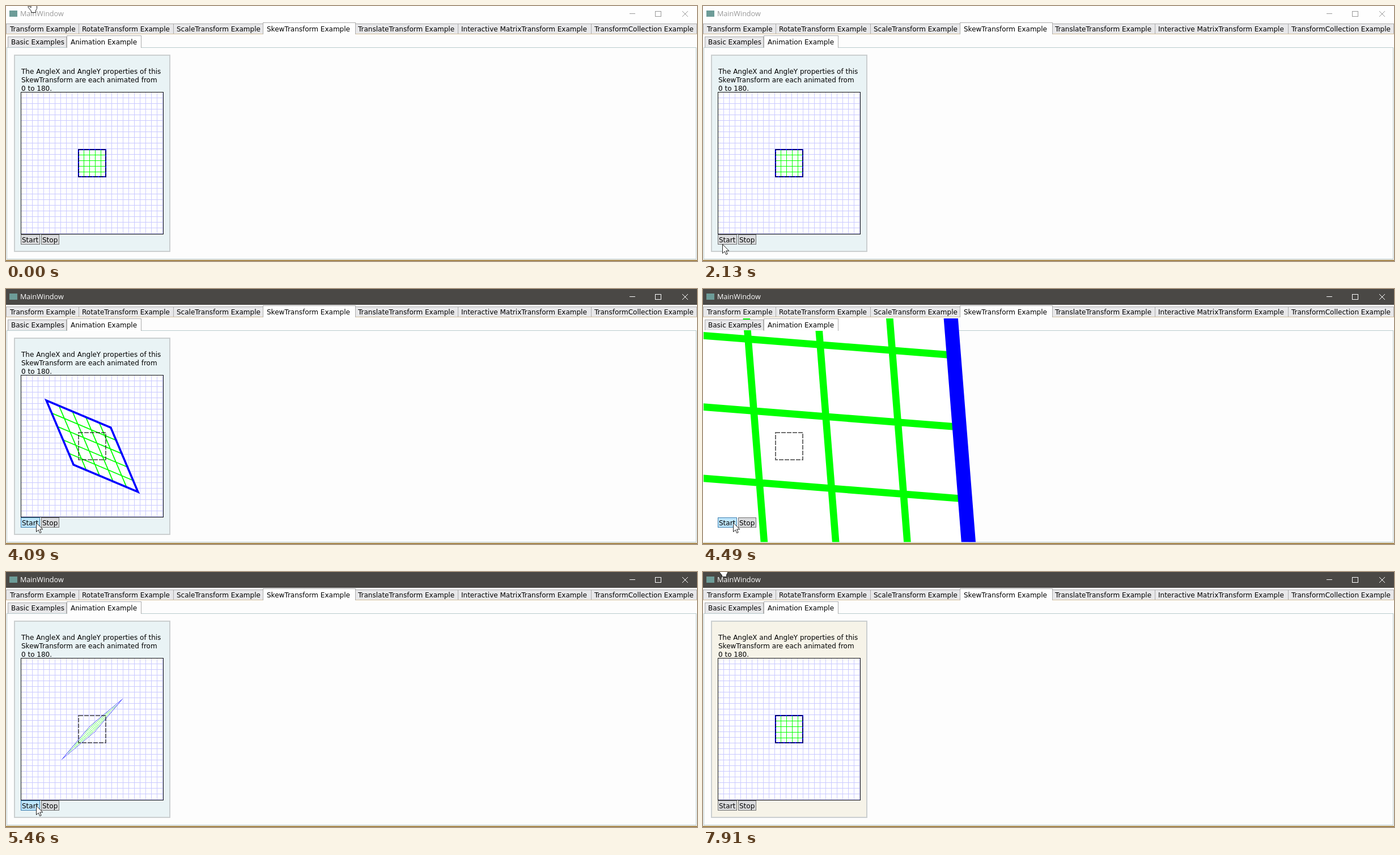
These frames come from a looping animation (1219x451 px, 8.02 s). An HTML page:

```html
<!DOCTYPE html>
<html lang="en">
<head>
<meta charset="utf-8">
<title>Skew animation</title>
<style>
  html, body { margin: 0; width: 100%; height: 100%; overflow: hidden; background: #fdfdfd; }
  svg { display: block; }
  text { font: 12px "DejaVu Sans", Verdana, sans-serif; fill: #000; white-space: pre; }
  .caption { font: 12.6px "Open Sans", "Noto Sans", sans-serif; }
  .crisp { shape-rendering: crispEdges; }
  .tab { fill: #e8e8ea; stroke: #acacac; }
  .selected { fill: #fefefe; }
  .button { fill: #dadbdd; stroke: #707070; }
  .hover { fill: #bee6fd; stroke: #3c7fb1; }
  .cursor { fill: #fff; stroke: #222; stroke-linejoin: round; }
</style>
</head>
<body>
<svg id="stage" width="1219" height="451" viewBox="0 0 1219 451">
  <defs>
    <clipPath id="content"><rect x="1" y="52" width="1217" height="395.5"/></clipPath>
  </defs>
  <rect width="1219" height="451" fill="#fdfdfd"/>
  <path class="crisp" d="M0 49.5H1219" stroke="#d6c09a"/>
  <path class="crisp" d="M0 450H1219" stroke="#a5864c" stroke-width="2"/>
  <rect class="crisp" x="1.5" y="73.5" width="1216" height="374" fill="none" stroke="#b9cbcd"/>

  <rect id="panel" class="crisp" x="15" y="87" width="274" height="347" stroke="#cbcfd0" stroke-width="2"/>
  <text x="27" y="120">The AngleX and AngleY properties of this</text>
  <text x="27" y="135">SkewTransform are each animated from</text>
  <text x="27" y="149.5">0 to 180.</text>
  <rect x="26" y="152" width="252" height="252" fill="#fff"/>
  <path id="backGrid" class="crisp" stroke="#cacaff"/>
  <rect class="crisp" x="26.5" y="152.5" width="251" height="251" fill="none" stroke="#111"/>

  <g clip-path="url(#content)">
    <g id="skewed">
      <rect x="-24" y="-24" width="48" height="48" fill="#fff"/>
      <path id="greenGrid" stroke="#0f0"/>
      <rect x="-24" y="-24" width="48" height="48" fill="none" stroke="#00f" stroke-width="2"/>
    </g>
  </g>
  <rect x="128" y="254" width="48" height="48" fill="none" stroke="#000"
        stroke-width="2" stroke-dasharray="8 2" opacity=".57"/>

  <rect id="start" class="button crisp" x="26.5" y="404.5" width="33" height="17"/>
  <rect class="button crisp" x="62.5" y="404.5" width="31" height="17"/>
  <text x="28" y="417.5">Start</text>
  <text x="64" y="417.5">Stop</text>

  <g id="tabs"></g>

  <rect id="bar" width="1219" height="28"/>
  <rect x="6" y="8" width="14" height="11" fill="#6d9c98"/>
  <text id="caption" class="caption" x="25" y="18">MainWindow</text>
  <g id="controls" fill="none">
    <path class="crisp" d="M1100 13.5H1110M1145.5 9.5H1155.5V18.5H1145.5Z"/>
    <path d="M1193 9L1203 19M1203 9L1193 19"/>
  </g>

  <path id="arrow" class="cursor" d="M.5 .5V16.5L4.2 13 6.7 18.6 9.2 17.5 6.7 12H11.8Z"/>
  <path id="hand" class="cursor" d="M0 1.5Q1.5 -1 3 1.5V8L9 9.5Q10.5 10 10.5 12V15.5L8.5 19V22.5H0.5V20L-5 13Q-5.5 10.5 -3 11L0 14Z"/>
</svg>
<script>
const LOOP = 8020, TICK = 97.805, LEAD = 24;
const CLICK = 27, DONE = 67;
const $ = id => document.getElementById(id);

// [tick, angle]
const angles = [[CLICK, 0], [34, 30.3], [46, 85.5], [50, 102.75], [56, 130], [DONE, 180]];
// [tick, x, y] of the pointer tip
const pointer = [[17, 48, 60], [20, 36, 380], [21, 33, 428], [22, 34, 421], [24, 46, 416], [26, 53, 413], [64, 53, 413], [67, 46, 60]];

function at(keys, k) {
  const i = Math.max(1, keys.findIndex(key => key[0] >= k));
  const a = keys[i - 1], b = keys[i];
  const p = (k - a[0]) / (b[0] - a[0]);
  return a.slice(1).map((v, n) => v + (b[n + 1] - v) * p);
}

function addTab(label, left, right, top, bottom, textX, selected) {
  const y = selected ? top - 2 : top;
  const base = selected ? top + 14 : top + 14.5;
  const name = selected ? "tab selected" : "tab";
  $("tabs").innerHTML +=
    `<path class="${name} crisp" d="M${left + .5} ${bottom}V${y + .5}H${right + .5}V${bottom}"/>` +
    `<text x="${textX}" y="${base}">${label}</text>`;
}

[
  ["Transform Example", 0, 128, 7],
  ["RotateTransform Example", 128, 295, 134],
  ["ScaleTransform Example", 295, 453, 301],
  ["TranslateTransform Example", 616, 797, 621],
  ["Interactive MatrixTransform Example", 797, 1032, 803],
  ["TransformCollection Example", 1032, 1218, 1038]
].forEach(([label, left, right, x]) => addTab(label, left, right, 30.5, 49, x));
addTab("SkewTransform Example", 453, 616, 30.5, 50, 460, true);
addTab("Basic Examples", 3, 106, 53.5, 73, 9);
addTab("Animation Example", 107, 238, 53.5, 74, 114, true);

let lines = "";
for (let n = 10; n < 252; n += 10) lines += `M${26.5 + n} 153V403M27 ${152.5 + n}H277`;
$("backGrid").setAttribute("d", lines);

lines = "";
for (let p = -14.55; p < 20; p += 10) lines += `M${p} -24V24M-24 ${p}H24`;
$("greenGrid").setAttribute("d", lines);

function place(el, pos) {
  el.style.display = pos ? "" : "none";
  if (pos) el.setAttribute("transform", `translate(${pos})`);
}

function draw(time) {
  const k = Math.floor((time + LEAD) / TICK);
  const running = k > CLICK && k < DONE;
  const skew = running ? Math.tan(at(angles, k)[0] * Math.PI / 180) : 0;
  $("skewed").setAttribute("transform", `matrix(1 ${skew} ${skew} 1 152 278)`);

  const active = k >= CLICK;
  $("bar").setAttribute("fill", active ? "#4a4845" : "#fefefe");
  $("caption").style.fill = active ? "#fff" : "#999";
  $("controls").setAttribute("stroke", active ? "#fff" : "#999");
  $("panel").setAttribute("fill", k > DONE ? "#f6f3e8" : "#e9f3f5");
  $("start").classList.toggle("hover", k >= 24 && k <= 64);

  place($("arrow"), k >= 17 && k <= 67 ? at(pointer, k) : null);
  place($("hand"), k === 0 || k >= 82 ? [44, -11] : k === 81 ? [33, -14] : null);
}

const began = performance.now();
function loop() {
  draw((performance.now() - began) % LOOP);
  requestAnimationFrame(loop);
}
loop();
</script>
</body>
</html>
```
